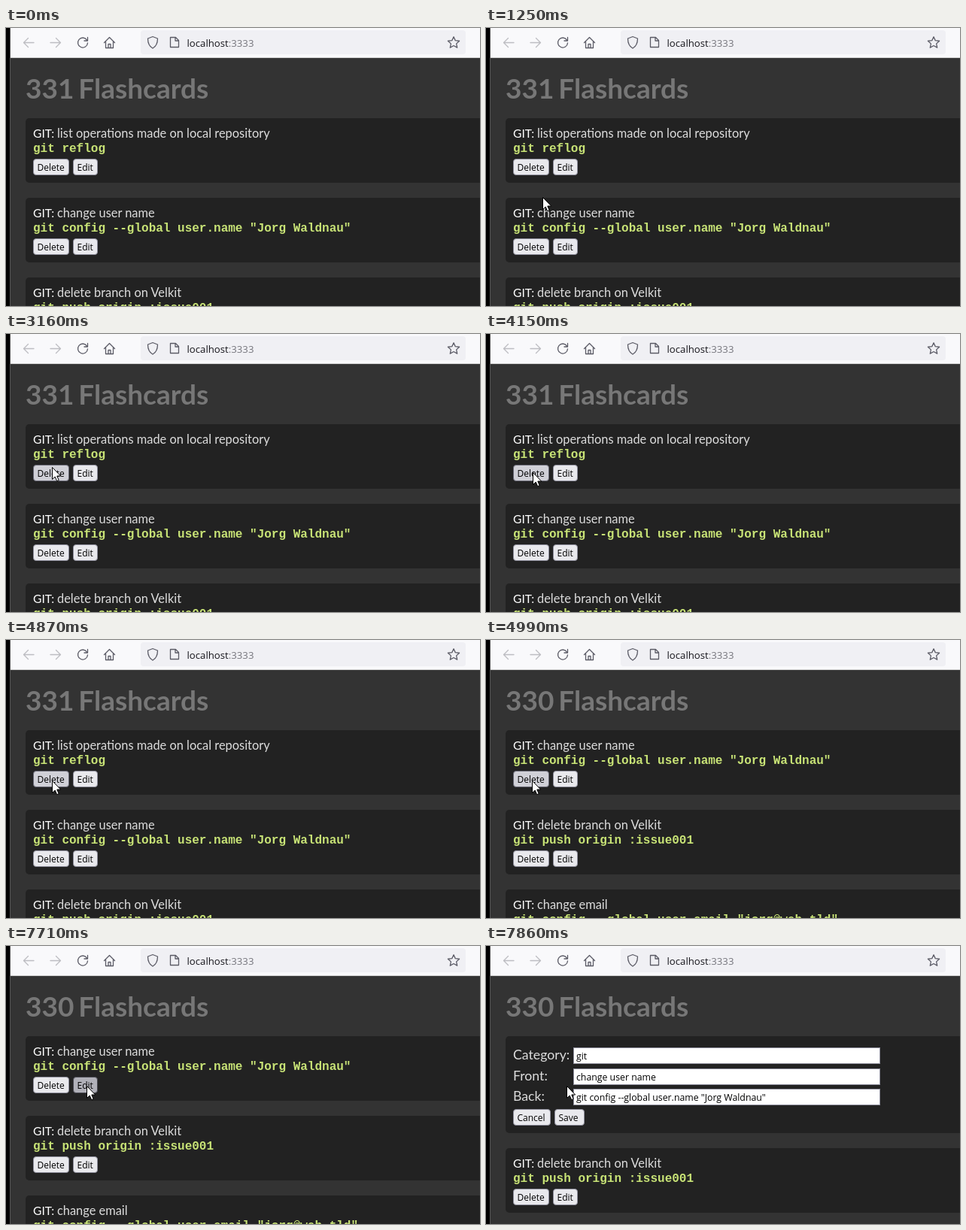
An HTML page for the animation above (8 s loop, 630 by 370 pixels).

```html
<!DOCTYPE html>
<html lang="en">
<head>
<meta charset="utf-8">
<title>Flashcards</title>
<style>
  html, body { margin: 0; width: 100%; height: 100%; overflow: hidden; background: #333; }
  svg { display: block; width: 630px; height: 370px; }
  text { white-space: pre; }
  .title { font: 700 37px Lato, sans-serif; fill: #777; word-spacing: -3px; }
  .front { font: 16.4px Lato, sans-serif; fill: #ddd; }
  .category { font: 15.6px Lato, sans-serif; fill: #fff; }
  .label { font: 17.7px Lato, sans-serif; fill: #ddd; }
  .code { font: 700 16px "Liberation Mono", monospace; fill: #c8e376; }
  .button { font: 12px "Open Sans", sans-serif; fill: #000; }
  .field { font: 12.3px "Open Sans", sans-serif; fill: #000; }
  .url { font: 13.2px "Open Sans", sans-serif; fill: #15141a; }
  .icon { fill: none; stroke: #5b5b66; stroke-width: 1.3; stroke-linecap: round; stroke-linejoin: round; }
  .off { stroke: #bdbdc2; }
</style>
</head>
<body>
<svg viewBox="0 0 630 370">
  <rect width="630" height="370" fill="#333"/>
  <rect x="6" width="624" height="40" fill="#f9f9fb"/>
  <rect x="6" y="39" width="624" height="1" fill="#ccc"/>
  <rect width="5" height="370" fill="#000"/>
  <rect x="5" width="1" height="370" fill="#555"/>
  <rect x="179" y="3" width="432" height="32" rx="4" fill="#f0f0f4"/>
  <path class="icon off" d="M37 19.500H24M29.500 13.500L23.500 19.500L29.500 25.500M59 19.500H72M66.500 13.500L72.500 19.500L66.500 25.500"/>
  <path class="icon" d="M107.500 16A6.500 6.500 0 1 0 108.500 20M108.500 12.500V17H104"/>
  <path class="icon" d="M130.500 19.500L137.500 12.500L144.500 19.500M132.500 18V26.500H142.500V18M136 26.500V21.500H139V26.500"/>
  <path class="icon" d="M195 11.500L201.500 14C201.500 20 199.500 24.500 195 27C190.500 24.500 188.500 20 188.500 14Z"/>
  <path class="icon" d="M218.500 12.500H225.500L229.500 16.500V25.500H218.500ZM225 12.500V17H229.500"/>
  <path class="icon" id="star"/>
  <text class="url" x="240.500" y="24.500">localhost<tspan fill="#75757c">:3333</tspan></text>
  <g id="page"></g>
  <g id="cursor"></g>
</svg>
<script>
const LOOP = 8000;
const DELETED = 4990, EDITING = 7860;
const PRESSES = [[4720, 4870], [7710, 7860]];

const CARDS = [
  ['list operations made on local repository', 'git reflog'],
  ['change user name', 'git config --global user.name "Jorg Waldnau"'],
  ['delete branch on Velkit', 'git push origin :issue001'],
  ['change email', 'git config --global user.email "jorg@web.tld"']
];

// Button fill and border
const IDLE = ['#e9e9ed', '#8f8f9d'];
const HOVER = ['#d0d0d7', '#676774'];
const ACTIVE = ['#b1b1b9', '#484851'];

// Pointer stops: time, shape, x, y (arrow tip or beam centre)
const STOPS = [
  [0, ''],
  [590, 'arrow', 169, 332], [710, 'arrow', 129, 303],
  [860, 'beam', 110, 273], [980, 'beam', 94.5, 252],
  [1130, 'beam', 84, 238], [1250, 'arrow', 75, 225],
  [1410, 'arrow', 66, 204], [1530, 'arrow', 62, 190], [1660, 'arrow', 61, 186],
  [3160, 'arrow', 61, 177], [3280, 'beam', 64.5, 163], [3400, 'arrow', 61, 150],
  [3550, 'beam', 65.5, 145], [3850, 'beam', 65.5, 153], [4000, 'arrow', 63, 173],
  [4150, 'arrow', 62, 184], [4270, 'arrow', 62, 190], [4420, 'arrow', 61, 190],
  [4570, 'arrow', 61, 187], [6560, 'arrow', 61, 192],
  [6710, 'arrow', 66, 209], [6830, 'arrow', 82, 223], [6950, 'arrow', 99, 213],
  [7100, 'arrow', 104, 199], [7250, 'arrow', 107, 187], [7400, 'arrow', 107, 186]
];

const SHAPES = {
  '': '',
  arrow: '<path d="M.5 .5V16.500L4.200 13L6.700 18.700L9.200 17.600L6.800 12H11.700Z" fill="#fff" stroke="#000"/>',
  beam: '<path d="M-3 -7.500H-1L0 -6.500L1 -7.500H3M0 -6.500V6.500M-3 7.500H-1L0 6.500L1 7.500H3" fill="none" stroke="#ddd"/>'
};

const byId = id => document.getElementById(id);
const text = (cls, x, y, s) => `<text class="${cls}" x="${x}" y="${y}">${s}</text>`;
const panel = (y, h) => `<rect x="26" y="${y}" width="620" height="${h}" rx="5" fill="#222"/>`;

function button(x, y, w, label, pointer) {
  const over = pointer.shape === 'arrow' &&
    pointer.x >= x && pointer.x <= x + w && pointer.y >= y && pointer.y <= y + 22;
  const [fill, border] = !over ? IDLE : pointer.down ? ACTIVE : HOVER;
  return `<rect x="${x + .5}" y="${y + .5}" width="${w - 1}" height="21" rx="3.500" fill="${fill}" stroke="${border}"/>` +
    text('button', x + 5.5, y + 16, label);
}

function card(y, [front, back], pointer) {
  return panel(y, 86) +
    text('front category', 36, y + 26, 'GIT:') +
    text('front', 68, y + 26, front) +
    text('code', 36, y + 45, back) +
    button(36, y + 54, 48, 'Delete', pointer) +
    button(89, y + 54, 33, 'Edit', pointer);
}

function field(y, label, value) {
  return text('label', 36, y + 16, label) +
    `<rect x="116.500" y="${y + .5}" width="407" height="21" fill="#fff" stroke="#8f8f9d"/>` +
    text('field', 120, y + 16, value);
}

function form(y, [front, back], pointer) {
  return panel(y, 129) +
    field(y + 15, 'Category:', 'git') +
    field(y + 43, 'Front:', front) +
    field(y + 70, 'Back:', back) +
    button(36, y + 97, 50, 'Cancel', pointer) +
    button(91, y + 97, 40, 'Save', pointer);
}

function page(t, pointer) {
  const deleted = t >= DELETED;
  const cards = CARDS.slice(deleted ? 1 : 0);
  let y = 120;
  let out = text('title', 26, 94, `${deleted ? 330 : 331} Flashcards`);
  if (t >= EDITING) {
    out += form(y, cards.shift(), pointer);
    y += 149;
  }
  for (const item of cards) {
    if (y < 370) out += card(y, item, pointer);
    y += 106;
  }
  return out;
}

function show(id, markup) {
  const node = byId(id);
  if (node.shown !== markup) node.innerHTML = node.shown = markup;
}

function render(t) {
  const [, shape, x = 0, y = 0] = STOPS.findLast(stop => stop[0] <= t);
  const down = PRESSES.some(([from, to]) => t >= from && t < to);
  show('page', page(t, { shape, x, y, down }));
  show('cursor', SHAPES[shape]);
  byId('cursor').setAttribute('transform', `translate(${x} ${y})`);
}

const starPoints = Array.from({ length: 10 }, (_, i) => {
  const r = i % 2 ? 3.8 : 8, a = (i / 5 - .5) * Math.PI;
  return `${(595 + r * Math.cos(a)).toFixed(2)} ${(19.7 + r * Math.sin(a)).toFixed(2)}`;
});
byId('star').setAttribute('d', `M${starPoints.join('L')}Z`);

const start = performance.now();
function tick(now) {
  render(Math.max(0, now - start) % LOOP);
  requestAnimationFrame(tick);
}
render(0);
requestAnimationFrame(tick);
</script>
</body>
</html>
```
